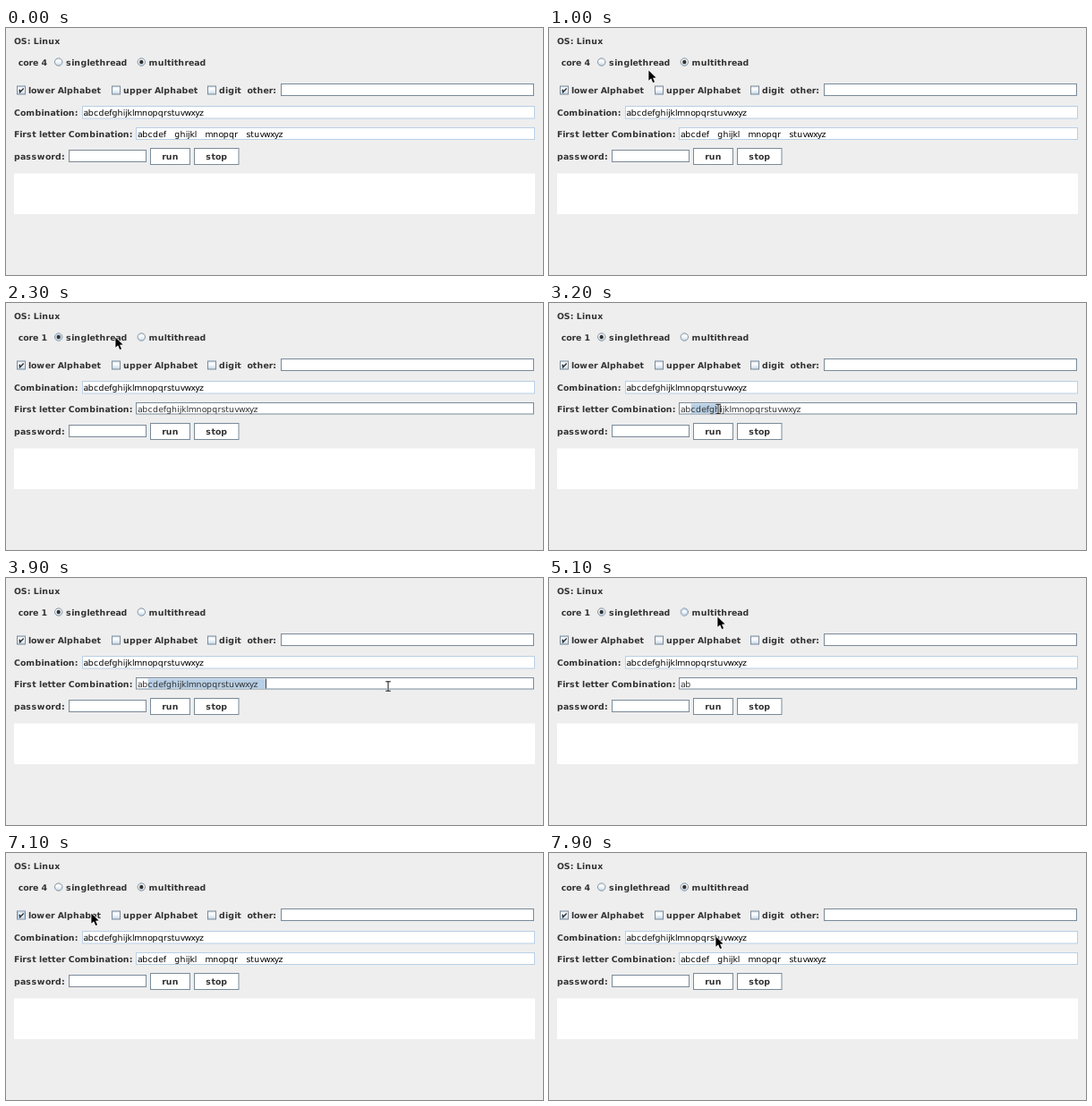
An HTML page with a canvas that plays this animation: 600x276 px, repeating every 8000 ms.

```html
<!DOCTYPE html>
<html lang="en">
<head>
<meta charset="utf-8">
<title>Character set options</title>
<style>
html, body { margin: 0; width: 600px; height: 276px; overflow: hidden; background: #eee; }
canvas { display: block; }
</style>
</head>
<body>
<canvas id="stage" width="600" height="276"></canvas>
<script>
const ctx = document.getElementById('stage').getContext('2d');
const LOOP = 8000, STEP = 100, SCALE = 0.78;
const INK = '#333', EDGE = '#7a8a99', PALE = '#b8cfe5';
const ALPHABET = 'abcdefghijklmnopqrstuvwxyz';
const GROUPS = 'abcdef   ghijkl   mnopqr   stuvwxyz';
const BOLD = 'bold 12px "DejaVu Sans", sans-serif';
const PLAIN = '12px "DejaVu Sans", sans-serif';

// Pointer way points: step, x, y
const PATH = [
  [2, 214, 267], [3, 211, 261], [4, 211, 261], [8, 132, 95], [10, 111, 47],
  [12, 108, 40], [20, 108, 40], [22, 114, 38], [23, 122, 38], [26, 223, 85],
  [29, 161.5, 121], [30, 161.5, 121], [31, 166, 120], [34, 235, 115.5],
  [37, 365, 121], [39, 427, 121], [46, 427, 121], [47, 425, 124],
  [51, 188, 43], [53, 180, 41], [68, 180, 41], [71, 95, 67], [75, 215, 102],
  [77, 215, 102], [79, 186, 93]
];

function pointerAt(step) {
  if (step < PATH[0][0]) return null;
  const next = PATH.findIndex(p => p[0] >= step);
  const b = PATH[next], a = PATH[Math.max(0, next - 1)];
  const k = b === a ? 0 : (step - a[0]) / (b[0] - a[0]);
  return { x: a[1] + (b[1] - a[1]) * k, y: a[2] + (b[2] - a[2]) * k };
}

// Advances snap to whole units, as hinted desktop text does.
function advance(ch, font) {
  ctx.font = font;
  const width = Math.round(ctx.measureText(ch).width);
  if (font === BOLD) return width + ('sw'.includes(ch) ? 1 : 0);
  return width - ('mvwxy'.includes(ch) ? 1 : 0);
}

const textWidth = (str, font) =>
  [...str].reduce((sum, ch) => sum + advance(ch, font), 0) * SCALE;

function text(str, x, y, font = BOLD, color = INK) {
  ctx.save();
  ctx.translate(x, y);
  ctx.scale(SCALE, SCALE);
  ctx.textRendering = 'geometricPrecision';
  ctx.fillStyle = color;
  let pen = 0;
  for (const ch of str) {
    const step = advance(ch, font);
    ctx.fillText(ch, pen, 0);
    pen += step;
  }
  ctx.restore();
}

function box(x, y, w, h, edge, fill = '#fff') {
  ctx.fillStyle = fill;
  ctx.fillRect(x, y, w, h);
  ctx.strokeStyle = edge;
  ctx.lineWidth = 1;
  ctx.strokeRect(x, y, w, h);
}

function sheen(y, h) {
  const g = ctx.createLinearGradient(0, y, 0, y + h);
  g.addColorStop(0, '#dde8f3');
  g.addColorStop(0.35, '#fff');
  g.addColorStop(1, '#c4d7e9');
  return g;
}

function radio(cx, label, { on, hover, pressed }) {
  const cy = 38;
  ctx.beginPath();
  ctx.arc(cx, cy, 4.2, 0, Math.PI * 2);
  ctx.fillStyle = pressed ? PALE : sheen(cy - 4, 8);
  ctx.fill();
  ctx.strokeStyle = EDGE;
  ctx.lineWidth = 0.9;
  ctx.stroke();
  if (hover && !pressed) {
    ctx.beginPath();
    ctx.arc(cx, cy, 3.2, 0, Math.PI * 2);
    ctx.strokeStyle = PALE;
    ctx.lineWidth = 1.2;
    ctx.stroke();
  }
  if (on) {
    ctx.beginPath();
    ctx.arc(cx, cy, 2.2, 0, Math.PI * 2);
    ctx.fillStyle = INK;
    ctx.fill();
  }
  text(label, cx + 8.3, 41.7);
}

function checkbox(x, label, labelX, checked, hover) {
  const y = 65;
  box(x, y, 9, 9, EDGE, sheen(y, 9));
  if (hover) {
    ctx.strokeStyle = PALE;
    ctx.strokeRect(x + 1, y + 1, 7, 7);
  }
  if (checked) {
    ctx.beginPath();
    ctx.moveTo(x + 2.6, y + 3.6);
    ctx.lineTo(x + 3.1, y + 6.6);
    ctx.lineTo(x + 7.2, y + 2.5);
    ctx.strokeStyle = INK;
    ctx.lineWidth = 1.5;
    ctx.stroke();
  }
  text(label, labelX, 73);
}

function button(x, w, label) {
  box(x, 134.5, w, 18, EDGE);
  text(label, x + (w - textWidth(label, BOLD)) / 2, 147.3);
}

function arrow({ x, y }) {
  ctx.save();
  ctx.translate(x, y);
  ctx.scale(SCALE, SCALE);
  ctx.beginPath();
  ctx.moveTo(0.5, 0.5);
  for (const [px, py] of [[0.5, 15], [4, 12], [6.6, 18], [9, 17], [6.5, 11.3], [11, 11]])
    ctx.lineTo(px, py);
  ctx.closePath();
  ctx.lineJoin = 'round';
  ctx.strokeStyle = '#fff';
  ctx.lineWidth = 1.6;
  ctx.stroke();
  ctx.fillStyle = '#000';
  ctx.fill();
  ctx.restore();
}

function beam({ x, y }) {
  ctx.beginPath();
  for (const side of [-1, 1]) {
    ctx.moveTo(x - 2.8, y + side * 5.2);
    ctx.lineTo(x + 2.8, y + side * 5.2);
  }
  ctx.moveTo(x, y - 5.2);
  ctx.lineTo(x, y + 5.2);
  ctx.lineCap = 'butt';
  ctx.strokeStyle = '#fff';
  ctx.lineWidth = 2.2;
  ctx.stroke();
  ctx.strokeStyle = '#111';
  ctx.lineWidth = 1;
  ctx.stroke();
}

function firstLetters(step, editable, pointer) {
  const left = 146.9, base = 121.5;
  if (!editable) {
    box(145.5, 111.5, 445, 13, PALE);
    text(GROUPS, left, base, PLAIN, '#000');
    return;
  }
  box(145.5, 111.5, 444, 12.5, EDGE);
  const content = step < 43 ? ALPHABET + '   ' : 'ab';
  const start = left + textWidth('ab', PLAIN);
  let caret = start;
  if (step >= 31 && step < 43) {
    // The selection ends at the character boundary nearest the dragged pointer.
    for (const ch of content.slice(2)) {
      const w = advance(ch, PLAIN) * SCALE;
      if (caret + w / 2 > pointer.x) break;
      caret += w;
    }
    ctx.fillStyle = PALE;
    ctx.fillRect(start, 112.5, caret - start, 11);
  }
  text(content, left, base, PLAIN, INK);
  const caretOn = (step >= 30 && step < 48) || (step >= 53 && step < 56);
  if (caretOn) {
    ctx.fillStyle = INK;
    ctx.fillRect(caret - 0.4, 112.5, 0.9, 11);
  }
}

function draw(step) {
  const pointer = pointerAt(step);
  const single = step >= 18 && step < 59;
  const editable = step >= 19 && step < 59;
  const over = (x0, x1, y0, y1) => !!pointer &&
    pointer.x >= x0 && pointer.x <= x1 && pointer.y >= y0 && pointer.y <= y1;

  ctx.fillStyle = '#eee';
  ctx.fillRect(0, 0, 600, 276);

  text('OS: Linux', 9, 18.3);
  text('core ' + (editable ? 1 : 4), 13.7, 41.7);
  radio(58.7, 'singlethread', {
    on: single, hover: over(53, 138, 31, 45), pressed: step >= 16 && step < 18
  });
  radio(151.3, 'multithread', {
    on: !single, hover: over(146, 225, 31, 45), pressed: step >= 56 && step < 59
  });

  checkbox(12.5, 'lower Alphabet', 25, true, over(11, 108, 62, 76));
  checkbox(118.5, 'upper Alphabet', 131, false, over(117, 216, 62, 76));
  checkbox(225.5, 'digit', 238, false, over(224, 265, 62, 76));
  text('other:', 269.5, 73);
  box(307.5, 62.5, 282, 13, EDGE);

  text('Combination:', 9, 97.7);
  box(85.5, 87.5, 505, 13.5, PALE);
  text(ALPHABET, 86.4, 97.7, PLAIN, '#000');

  text('First letter Combination:', 9, 121.5);
  firstLetters(step, editable, pointer);

  text('password:', 9, 147.3);
  box(70.5, 136.5, 86, 13, EDGE);
  button(161.5, 44, 'run');
  button(210.5, 49.5, 'stop');

  ctx.fillStyle = '#fff';
  ctx.fillRect(9, 162.5, 582, 45.5);

  if (!pointer) return;
  if (editable && over(145, 590, 111, 125)) beam(pointer);
  else arrow(pointer);
}

const origin = performance.now();
function tick() {
  draw(Math.floor(((performance.now() - origin) % LOOP) / STEP));
  requestAnimationFrame(tick);
}
tick();
</script>
</body>
</html>
```
